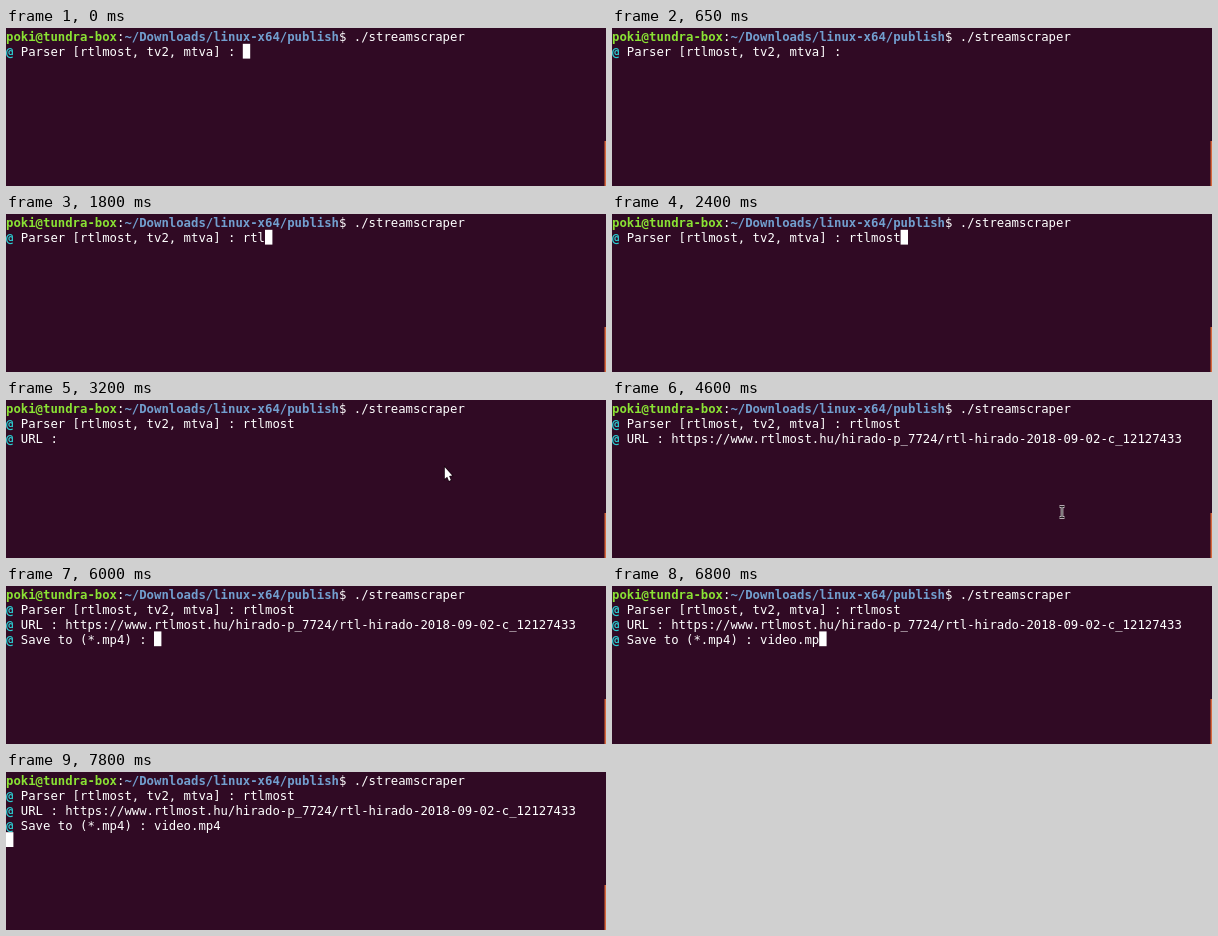
Animation, 600 px wide and 158 px high, one loop 8 s. Source, as an HTML page with a canvas:

```html
<!DOCTYPE html>
<html lang="en">
<head>
<meta charset="utf-8">
<title>Terminal session</title>
<style>
html, body { margin: 0; width: 100%; height: 100%; overflow: hidden; background: #300a24; }
canvas { display: block; width: 600px; height: 158px; }
</style>
</head>
<body>
<canvas id="stage" width="600" height="158"></canvas>
<script>
const ctx = document.getElementById('stage').getContext('2d');
const LOOP = 8000;
const CELL = 7.4, LINE = 14.8, TOP = 1, BASE = 12.2;
const WHITE = '#ffffff', GREEN = '#8ae234', BLUE = '#729fcf', CYAN = '#2bcbd0';
const URL_TEXT = 'https://www.rtlmost.hu/hirado-p_7724/rtl-hirado-2018-09-02-c_12127433';

// Each prompt opens at `start`; `keys` are the times of its keystrokes.
const prompts = [
  { label: ' Parser [rtlmost, tv2, mtva] : ', start: 0, text: 'rtlmost',
    keys: [1650, 1700, 1800, 1950, 2050, 2200, 2350] },
  { label: ' URL : ', start: 2800, text: URL_TEXT, paste: 4050 },
  { label: ' Save to (*.mp4) : ', start: 4850, text: 'video.mp4',
    keys: [6050, 6150, 6250, 6350, 6450, 6550, 6650, 6750, 6850] }
];
const END = 7400;
const hidden = [[400, 1200], [3200, 3650], [4400, 4850], [5250, 6000]];
const MENU = [3650, 4050];

const within = (t, [from, to]) => t >= from && t < to;

function print(text, col, row, color, bold = false) {
  ctx.font = `${bold ? 'bold ' : ''}12.29px "DejaVu Sans Mono", monospace`;
  ctx.fillStyle = color;
  [...text].forEach((ch, i) =>
    ctx.fillText(ch, (col + i) * CELL, TOP + row * LINE + BASE));
  return col + text.length;
}

function shellLine() {
  let col = print('poki@tundra-box', 0, 0, GREEN, true);
  col = print(':', col, 0, WHITE);
  col = print('~/Downloads/linux-x64/publish', col, 0, BLUE, true);
  print('$ ./streamscraper', col, 0, WHITE);
}

function typed(p, t) {
  const count = p.keys ? p.keys.filter(k => t >= k).length
                       : t >= p.paste ? p.text.length : 0;
  return p.text.slice(0, count);
}

function textCursor(col, row, hollow) {
  const x = col * CELL, y = TOP + row * LINE;
  if (hollow) {
    ctx.strokeStyle = WHITE;
    ctx.lineWidth = 1;
    ctx.strokeRect(Math.round(x) - .5, Math.round(y) + .5, 8, 14);
  } else {
    ctx.fillStyle = WHITE;
    ctx.fillRect(x, y, CELL, LINE);
  }
}

function menuItem(label, baseline, color) {
  ctx.font = '11.6px "Open Sans", sans-serif';
  ctx.fillStyle = color;
  ctx.fillText(label, 455.5, baseline);
}

function menu(highlight) {
  ctx.fillStyle = '#403d38';
  ctx.fillRect(440, 69, 112, 89);
  if (highlight) {
    const glow = ctx.createLinearGradient(0, 107, 0, 125);
    glow.addColorStop(0, '#f38250');
    glow.addColorStop(1, '#e8622d');
    ctx.fillStyle = glow;
    ctx.fillRect(440, 107, 112, 18);
  }
  ctx.fillStyle = '#504d47';
  ctx.fillRect(441, 127, 110, 1);
  menuItem('Copy', 82, '#8b877e');
  menuItem('Copy as HTML', 101, '#8b877e');
  menuItem('Paste', 120, WHITE);
  menuItem('Read-Only', 141, '#e2dfd8');
  menuItem('Preferences', 160, '#e2dfd8');
}

function arrow(x, y) {
  const points = [[0, 0], [0, 11.5], [2.4, 9.4], [4.2, 13.6], [6, 12.8], [4.3, 8.6], [7.4, 8.2]];
  ctx.beginPath();
  points.forEach(([dx, dy]) => ctx.lineTo(x + dx, y + dy));
  ctx.closePath();
  ctx.strokeStyle = '#1a0613';
  ctx.lineWidth = 1.5;
  ctx.stroke();
  ctx.fillStyle = WHITE;
  ctx.fill();
}

function beam(x, y) {
  const stroke = (color, width) => {
    ctx.strokeStyle = color;
    ctx.lineWidth = width;
    ctx.beginPath();
    ctx.moveTo(x - 2.5, y - 5.5); ctx.lineTo(x + 2.5, y - 5.5);
    ctx.moveTo(x, y - 5.5); ctx.lineTo(x, y + 5.5);
    ctx.moveTo(x - 2.5, y + 5.5); ctx.lineTo(x + 2.5, y + 5.5);
    ctx.stroke();
  };
  stroke('#e4dfe2', 2.6);
  stroke('#241c20', 1);
}

function glide(t, from, to, a, b) {
  const u = Math.min(1, Math.max(0, (t - from) / (to - from)));
  const e = u * u * (3 - 2 * u);
  return a.map((v, i) => v + (b[i] - v) * e);
}

function pointer(t) {
  if (within(t, [2900, 3650])) arrow(...glide(t, 2900, 3200, [447, 96], [438.8, 67.3]));
  else if (within(t, [3650, 4850])) beam(...glide(t, 3650, 3800, [442, 74], [450, 112]));
}

function draw(t) {
  ctx.fillStyle = '#300a24';
  ctx.fillRect(0, 0, 600, 158);
  ctx.fillStyle = '#d9683c';
  ctx.fillRect(598.5, 113, 1.5, 45);

  shellLine();
  let col = 0, row = 0;
  for (const p of prompts) {
    if (t < p.start) break;
    row++;
    print('@', 0, row, CYAN, true);
    col = print(p.label + typed(p, t), 1, row, WHITE);
  }
  if (t >= END) { col = 0; row++; }

  const menuOpen = within(t, MENU);
  if (!hidden.some(span => within(t, span))) textCursor(col, row, menuOpen);
  if (menuOpen) menu(t >= 3750);
  pointer(t);
}

function frame(now) {
  const t = now % LOOP;
  draw(Math.floor(t / 50) * 50);
  requestAnimationFrame(frame);
}
draw(0);
requestAnimationFrame(frame);
</script>
</body>
</html>
```
